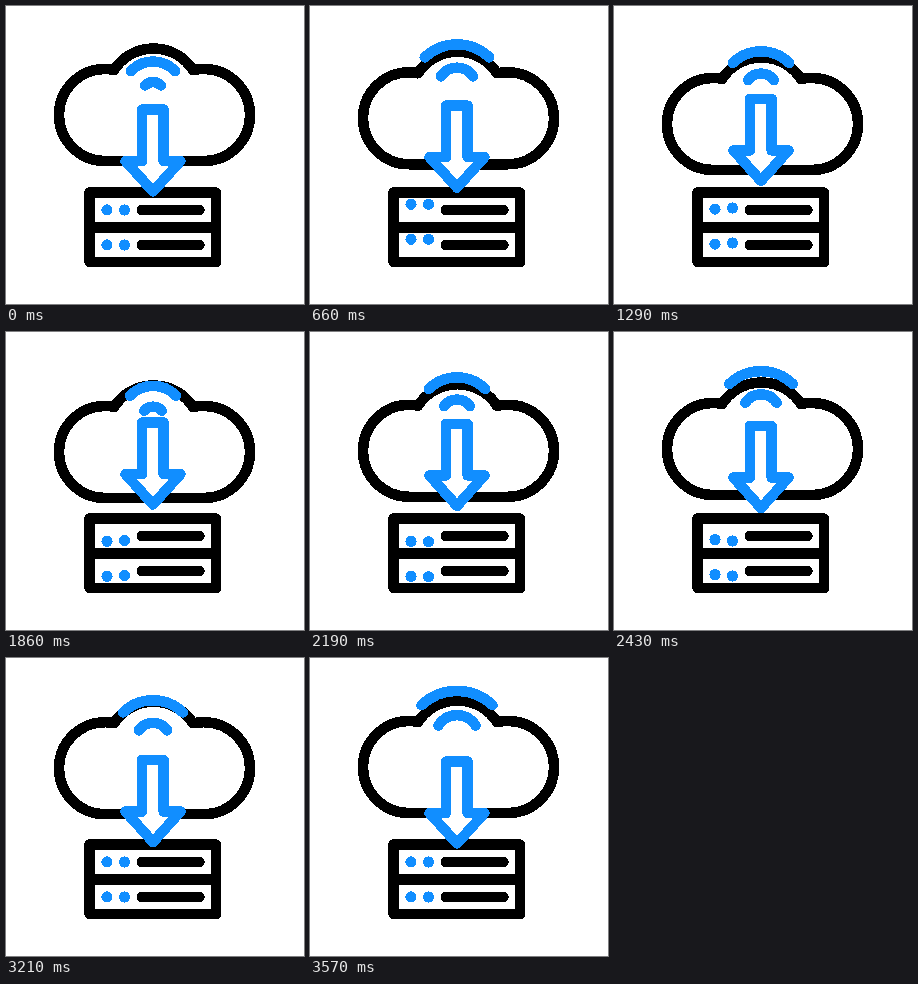
An HTML page for the animation above (3600 ms loop, 298 px wide and 298 px high).

```html
<!DOCTYPE html>
<html lang="en">
<head>
<meta charset="utf-8">
<title>Cloud download</title>
<style>
  html, body { margin: 0; width: 100%; height: 100%; overflow: hidden; background: #fff; }
  svg { display: block; width: 100vw; height: 100vh; shape-rendering: crispEdges; }
  .line { fill: none; stroke: #000; stroke-width: 10.5; stroke-linecap: round; stroke-linejoin: round; }
  .blue { stroke: #118eff; }
  .dot { fill: #118eff; }
</style>
</head>
<body>
<svg viewBox="0 0 298 298">
  <path id="cloud" class="line" d="M99 155A46 46 0 0 1 99 63Q104 63 108 64A47 47 0 0 1 187 64Q192 63 198 63A46 46 0 0 1 198 155Z"/>
  <g class="line">
    <path d="M83.5 186.5H210V256H83.5ZM83.5 221.5H210"/>
    <path d="M136 204H193.5M136 239H193.5"/>
  </g>
  <g id="colA" class="dot"><circle cx="101" cy="204" r="5.6"/><circle cx="101" cy="239" r="5.6"/></g>
  <g id="colB" class="dot"><circle cx="118.5" cy="204" r="5.6"/><circle cx="118.5" cy="239" r="5.6"/></g>
  <path id="inner" class="line blue"/>
  <path id="outer" class="line blue"/>
  <path id="arrow" class="line blue" style="fill:#fff" d="M136 103.5H157.6V155H174.5L147 185.5L119.5 155H136Z"/>
</svg>
<script>
  const LOOP = 3600, PULSE = 900, CX = 147;
  const get = id => document.getElementById(id);
  const [cloud, arrow, colA, colB, inner, outer] =
    ['cloud', 'arrow', 'colA', 'colB', 'inner', 'outer'].map(get);

  // Each signal arc grows between two sizes: half width, end height, top height
  const innerSizes = [[8, 79.5, 76], [19, 67, 56.5]];
  const outerSizes = [[22, 65, 55.5], [36, 46.5, 32.2]];

  const shift = (el, y) => el.setAttribute('transform', `translate(0 ${y.toFixed(2)})`);

  // One full swing up and down, then rest
  const bob = (t, span) => t < span ? -5.8 * Math.sin(2 * Math.PI * t / span) : 0;

  function signal(el, [from, to], p) {
    const [half, end, top] = from.map((v, i) => v + (to[i] - v) * p);
    const sag = end - top;
    const r = (half * half + sag * sag) / (2 * sag);
    el.setAttribute('d', `M${CX - half} ${end}A${r} ${r} 0 0 1 ${CX + half} ${end}`);
  }

  function draw(t) {
    const sway = (1 - Math.cos(2 * Math.PI * t / LOOP)) / 2;
    shift(cloud, 11 * sway);
    shift(arrow, -13 * sway);
    shift(colA, bob(t, 2720));
    shift(colB, bob(t, 2900));
    const p = t % PULSE / PULSE;
    signal(inner, innerSizes, p);
    signal(outer, outerSizes, p);
  }

  const start = performance.now();
  function tick(now) {
    draw(Math.max(0, now - start) % LOOP);
    requestAnimationFrame(tick);
  }
  draw(0);
  requestAnimationFrame(tick);
</script>
</body>
</html>
```
